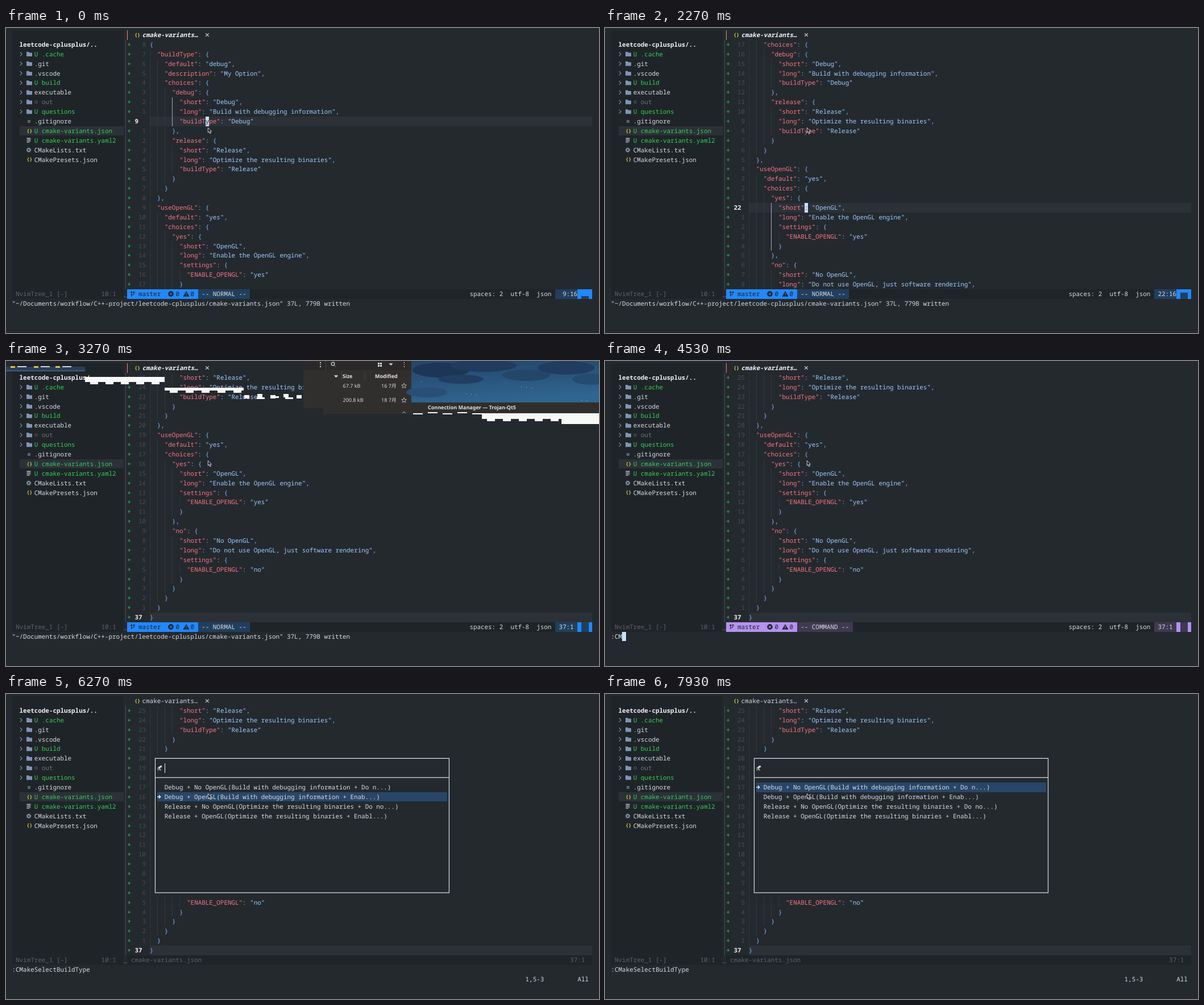
An HTML page that plays this animation: 1043x537 px, repeating every 8 s.

```html
<!DOCTYPE html>
<html lang="en">
<head>
<meta charset="utf-8">
<title>Editor session</title>
<style>
html, body { margin: 0; width: 100%; height: 100%; overflow: hidden; background: #24292e; }
svg { display: block; width: 100%; height: 100%; }
text {
  font: 10.907px "Noto Sans Mono", "DejaVu Sans Mono", monospace;
  font-variant-ligatures: none;
  text-rendering: geometricPrecision;
  white-space: pre;
}
.b { font-weight: 700; }
.bi { font-weight: 700; font-style: italic; }
.icon { font-size: 8.6px; font-weight: 700; }
.ui { font: 9px "Noto Sans", "Noto Sans CJK JP", sans-serif; }
.uib { font: 600 9px "Noto Sans", sans-serif; }
rect { shape-rendering: crispEdges; }
</style>
</head>
<body>
<svg id="stage" viewBox="0 0 1043 537">
  <defs>
    <linearGradient id="sky" x1="0" y1="0" x2="0.3" y2="1">
      <stop offset="0" stop-color="#234468"/><stop offset="1" stop-color="#30658f"/>
    </linearGradient>
  </defs>
</svg>
<script>
const LOOP = 8000, CW = 6.544, RH = 16.89, CODE = 37;
const X = c => 10.5 + c * CW;
const Y = r => 3.65 + r * RH;
const C = {
  bg: '#24292e', dark: '#1f2428', line: '#2c3138', text: '#d8dde3', white: '#f0f3f6',
  dim: '#5b636c', num: '#444d56', guide: '#30373e', scope: '#a4abb3', green: '#34d058',
  add: '#28a745', key: '#f97583', str: '#9ecbff', punct: '#79b8ff', cursor: '#c8e1ff',
  blue: '#2188ff', navy: '#213f5e', purple: '#b392f0', plum: '#40394f', yellow: '#cbcb41'
};

const variants = {
  buildType: {
    default: 'debug',
    description: 'My Option',
    choices: {
      debug: { short: 'Debug', long: 'Build with debugging information', buildType: 'Debug' },
      release: { short: 'Release', long: 'Optimize the resulting binaries', buildType: 'Release' }
    }
  },
  useOpenGL: {
    default: 'yes',
    choices: {
      yes: { short: 'OpenGL', long: 'Enable the OpenGL engine', settings: { ENABLE_OPENGL: 'yes' } },
      no: { short: 'No OpenGL', long: 'Do not use OpenGL, just software rendering', settings: { ENABLE_OPENGL: 'no' } }
    }
  }
};
const lines = JSON.stringify(variants, null, 2).split('\n');
const indent = lines.map(s => s.search(/\S/));

// [time, value] tracks with hard changes
const moves = [[0, 9], [270, 8], [800, 7], [870, 5], [930, 3], [1000, 1], [1270, 2], [2270, 22],
  [2330, 24], [2400, 26], [2470, 28], [2530, 30], [2600, 32], [2670, 35], [2800, 37]];
const typed = [[0, '"~/Documents/workflow/C++-project/leetcode-cplusplus/cmake-variants.json" 37L, 779B written'],
  [4130, ':'], [4330, ':C'], [4530, ':CM'], [4930, ':CMa'], [5130, ':CMakeSelectBuildType']];
const picks = [[5730, 9], [6270, 10], [6400, 11], [6600, 12], [6930, 11], [7130, 10], [7400, 9]];
const at = (track, t) => track.reduce((v, [time, next]) => t >= time ? next : v, track[0][1]);

const rect = (x, y, w, h, fill) => `<rect x="${x}" y="${y}" width="${w}" height="${h}" fill="${fill}"/>`;
const cells = (r, c, n, fill, rows = 1) => rect(X(c), Y(r), n * CW, rows * RH, fill);
const label = (x, y, s, fill, cls = '') => `<text x="${x}" y="${y}" fill="${fill}" class="${cls}">${s}</text>`;
const put = (r, c, s, fill, cls) => label(X(c), Y(r) + 12.3, s, fill, cls);
const path = (d, fill, stroke = 'none', sw = 1) =>
  `<path d="${d}" fill="${fill}" stroke="${stroke}" stroke-width="${sw}"/>`;
const shift = (x, y, body) => `<g transform="translate(${x} ${y})">${body}</g>`;
const mid = r => Y(r) + RH / 2;

const braces = (r, c) => label(X(c) - 0.5, Y(r) + 11.2, '{}', C.yellow, 'icon');
const icons = {
  folder: path('M-5-4h4l1.2 1.5H5V4H-5z', '#8094b4'),
  git: rect(-2.5, -2.5, 5, 5, '#59626b'),
  list: path('M-3.5-3.5h7M-3.5-1.2h7M-3.5 1.1h7M-3.5 3.4h5', 'none', C.text, 1.1),
  gear: '<circle r="3.3" fill="none" stroke="#8da5b0" stroke-width="1.6" stroke-dasharray="1.7 .9"/>' +
    '<circle r="2.2" fill="none" stroke="#8da5b0" stroke-width="1.2"/>'
};

const tree = [['folder', 'U .cache', C.green], ['folder', '.git'], ['folder', '.vscode'],
  ['folder', 'U build', C.green], ['folder', 'executable'], ['folder', '  out', '#6a737d'],
  ['folder', 'U questions', C.green], ['git', '.gitignore'], ['', 'U cmake-variants.json', C.green],
  ['list', 'U cmake-variants.yaml2', C.green], ['gear', 'CMakeLists.txt'], ['', 'CMakePresets.json']];

function sidebar() {
  let s = cells(0, 0, 30, C.dark, 28) + cells(10, 2, 28, C.line) +
    put(1, 2, 'leetcode-cplusplus/..', C.white, 'b');
  tree.forEach(([icon, name, fill = C.text], i) => {
    const r = i + 2, y = mid(r);
    if (icon === 'folder') s += shift(26.5, y, path('M-1.7-3.4L1.7 0L-1.7 3.4', 'none', '#8a929b', 1.1));
    s += icon ? shift(41 - (icon === 'folder' ? 0 : 1), y, icons[icon]) : braces(r, 4);
    s += put(r, 6, name, fill);
  });
  return s + `<circle cx="53" cy="${mid(7)}" r="2.2" fill="none" stroke="#6a737d" stroke-width=".8"/>` +
    rect(209.6, Y(1), 1, 26 * RH, '#454a57') +
    put(27, 1, 'NvimTree_1 [-]', C.dim) + put(27, 24, '10:1', C.dim) + put(27, 30, '_', C.dim);
}

const paint = s => s.replace(/("[^"]*")(:?)|[{},]+/g, (m, str, colon) => {
  const span = (v, fill) => `<tspan fill="${fill}">${v}</tspan>`;
  if (!str) return span(m, C.punct);
  return span(str, colon ? C.key : C.str) + (colon ? span(':', C.punct) : '');
});

// Block around the cursor line: [opening line, end], zero-based
function scope(i) {
  let a = i;
  const own = indent[i];
  if (!lines[i].endsWith('{')) {
    const closes = lines[i].trim()[0] === '}';
    do a--; while (closes ? indent[a] > own : indent[a] >= own);
  }
  let b = a + 1;
  while (indent[b] > indent[a]) b++;
  return [a, b];
}

function editor(t, line) {
  const top = Math.min(12, Math.max(1, line - 17));
  const row = n => n - top + 1;
  const [a, b] = scope(line - 1);
  const col = Math.min(16, lines[line - 1].length);
  let s = cells(row(line), CODE, 156 - CODE, C.line);
  for (let n = top; n < top + 26; n++) {
    const r = row(n), i = n - 1;
    s += put(r, 31, '+', C.add, 'b');
    s += n === line ? put(r, 33, n, C.white, 'b')
      : put(r, 33, String(Math.abs(n - line)).padStart(3), C.num);
    for (let k = 0; k < indent[i]; k += 2) {
      const lit = k && k === indent[a] && i > a && i < b;
      s += rect(X(CODE + k), Y(r), 1, RH, lit ? C.scope : C.guide);
    }
    s += put(r, CODE + indent[i], paint(lines[i].trim()), C.text);
  }
  if (t >= 1330 && line === 2) s += cells(row(17), 39, 1, '#2b6b70') + put(row(17), 39, '}', C.cursor);
  const hidden = t >= 3270 && t < 3870;
  if (t < 4130 && !hidden)
    s += cells(row(line), CODE + col - 1, 1, C.cursor) +
      put(row(line), CODE + col - 1, lines[line - 1][col - 1], C.dark);
  return s;
}

function tab(active) {
  return (active ? rect(213, Y(0), 1.4, RH, '#f9826c') : '') + braces(0, 33) +
    put(0, 35, 'cmake-variants…', active ? C.white : C.text, active ? 'bi' : '') +
    shift(353.9, mid(0), path('M-2.8-2.8L2.8 2.8M2.8-2.8L-2.8 2.8', 'none', C.text, 1.1));
}

function status(t, line) {
  const base = cells(27, 31, 125, C.dark);
  if (t >= 5730) return base + put(27, 32, 'cmake-variants.json', C.dim) + put(27, 150, '37:1', C.dim);
  const cmd = t >= 4130, main = cmd ? C.purple : C.blue, soft = cmd ? C.plum : C.navy;
  const mode = ` -- ${cmd ? 'COMMAND' : 'NORMAL'} -- `;
  const col = Math.min(16, lines[line - 1].length);
  const level = Math.ceil(line / 37 * 9) - 1;
  const y = mid(27);
  return base + cells(27, 31, 19, main) + cells(27, 50, mode.length, soft) +
    shift(222.8, y, path('M-2-3.5V4M-2 2Q2.3 2 2.3-2M-3.5-2L-2-4L-.5-2M1-2L2.3-4L3.6-2', 'none', C.dark, 1.1)) +
    put(27, 34, 'master', C.dark) +
    shift(290, y, `<circle r="4.8" fill="${C.dark}"/>` + path('M-2-2L2 2M2-2L-2 2', 'none', main, 1.2)) +
    put(27, 44, '0', C.dark) +
    shift(317, y, path('M0-5L5.6 4.6H-5.6z', C.dark) + path('M0-2V1.6M0 2.5V3.7', 'none', main, 1.2)) +
    put(27, 48, '0', C.dark) + put(27, 50, mode, C.text) +
    put(27, 123, 'spaces: 2', C.text) + put(27, 134, 'utf-8', C.text) + put(27, 141, 'json', C.text) +
    cells(27, 146, 6, soft) + put(27, 147, String(line).padStart(2) + ':' + col, C.text) +
    cells(27, 152, 4, main) +
    (level ? rect(X(153), Y(28) - RH * level / 8, 2 * CW, RH * level / 8, soft)
      : put(27, 153, '__', C.dark));
}

function prompt(t) {
  const s = at(typed, t);
  return put(28, 0, s, C.text) + (t >= 4130 && t < 5730 ? cells(28, s.length, 1, C.cursor) : '');
}

const options = ['Debug + No OpenGL(Build with debugging information + Do n...)',
  'Debug + OpenGL(Build with debugging information + Enab...)',
  'Release + No OpenGL(Optimize the resulting binaries + Do no...)',
  'Release + OpenGL(Optimize the resulting binaries + Enabl...)'];

function picker(t) {
  if (t < 5730) return '';
  const x1 = X(38.5), x2 = X(117.5), pick = at(picks, t);
  let s = cells(6, 38, 80, C.bg, 15) +
    path(`M${x1} ${mid(6)}H${x2}V${mid(20)}H${x1}zM${x1} ${mid(8)}H${x2}`, 'none', C.text, 1.2) +
    shift(270, mid(7), path('M-4 .5L3-3.5M-1.5 .5L-3 4.5M0 0L2.5 4.5M0 0V4', 'none', C.text, 1) +
      path('M-1.8-1.8L3-4.8L4.5-2.2L-.6 .8z', C.text));
  if (t < 7930) s += rect(X(41), Y(7), 1.2, RH, C.white);
  if (t >= 5800) {
    s += cells(pick, 39, 78, '#284669') +
      shift(X(39), mid(pick), path('M.3 0H5.8M3.2-2.7L6 0L3.2 2.7', 'none', C.white, 1.3));
    options.forEach((o, i) => s += put(9 + i, 41, o, C.text));
  }
  return s + put(29, 138, '1,5-3', C.text) + put(29, 152, 'All', C.text);
}

// Pieces of other windows that flash through for a moment
function flash(t) {
  if (t < 3270 || t >= 3400) return '';
  const white = '#f8f8f6', panel = '#312f2e';
  const teeth = (x, y, w, h, step) => {
    let s = rect(x, y, w, h, white);
    for (let k = 0; k * step < w - 10; k++) s += rect(x + k * step + 9, y + h, 14, 4, white);
    return s;
  };
  const dashes = (x, y, n, step, w, h) =>
    Array.from({ length: n }, (_, k) => rect(x + k * step, y - k % 2 * 2, w, h, white)).join('');
  const star = y => shift(700, y,
    path('M0-4.4L1.2-1.4L4.4-1.2L1.9 .8L2.7 4L0 2.2L-2.7 4L-1.9 .8L-4.4-1.2L-1.2-1.4z', 'none', '#c8c5c2', .9));
  const puff = (x, y, rx, ry, fill) => `<ellipse cx="${x}" cy="${y}" rx="${rx}" ry="${ry}" fill="${fill}"/>`;
  let s = rect(0, 10, 139, 8, '#2c3f58') + rect(0, 17, 139, 1, '#527aa5');
  for (const x of [8, 49, 87]) s += rect(x, 9, 8, 3, '#e2c04b') + rect(x + 12, 9, 16, 2, '#cfd6de');
  s += teeth(139, 28, 140, 9, 27) + teeth(279, 47, 139, 5, 28) +
    dashes(419, 60, 5, 23, 9, 6) + dashes(441, 64, 3, 25, 14, 3);

  s += rect(523, 0, 190, 83, panel) + rect(558, 80, 155, 13, panel) + rect(523, 0, 190, 16, '#2b2928') +
    rect(562, 0, 1, 16, '#454240') + rect(590, 18, 1, 17, '#454240') + rect(631, 18, 1, 17, '#454240') +
    '<circle cx="575" cy="5" r="2.8" fill="none" stroke="#ddd" stroke-width="1.2"/>' +
    path('M577 7.3l3 3M577.5 25.5h6l-3 3.5zM674 4.5h6l-3 3z', '#ddd', '#ddd', .6);
  for (const x of [552, 699.5]) for (const y of [2, 5.5, 9]) s += rect(x, y, 1.6, 1.6, '#ddd');
  for (const x of [654, 658]) for (const y of [3, 7]) s += rect(x, y, 2.6, 2.6, '#ddd');
  s += label(592, 30, 'Size', '#e4e1de', 'uib') + label(649, 30, 'Modified', '#e4e1de', 'uib');
  [['67.7 kB', '16 7月', 43.5], ['200.8 kB', '18 7月', 69]].forEach(([size, date, y]) =>
    s += label(592.5, y + 3.2, size, '#d8d4d0', 'ui') + label(660, y + 3.2, date, '#d8d4d0', 'ui') + star(y));
  s += path('M697 92l3-2.5l3 2.5', 'none', '#c8c5c2');

  s += rect(713, 0, 330, 74, 'url(#sky)') +
    puff(765, 16, 50, 13, '#1d3556') + puff(840, 8, 58, 11, '#203b5e') + puff(800, 32, 40, 8, '#213e62') +
    puff(915, 25, 42, 10, '#244669') + puff(985, 12, 50, 12, '#203d60') + puff(1030, 32, 34, 10, '#264b70') +
    puff(740, 55, 36, 9, '#294f76');
  for (let k = 0; k < 9; k++)
    s += rect(730 + k * 97 % 300, 36 + k * 23 % 35, 1, 1, '#a8c4d8');
  return s + rect(713, 73, 330, 19, '#302e2d') +
    `<text x="819.5" y="85" fill="#e4e1de" class="uib" text-anchor="middle">Connection Manager — Trojan-Qt5</text>` +
    dashes(716, 92, 5, 26, 17, 2) + teeth(837, 92, 140, 10, 28) + rect(977, 92, 66, 19, white);
}

const pointer = shift(355.3, 175.5,
  path('M0 0V8.6L2 6.9L3.5 10.3L5 9.6L3.6 6.4H6.2z', '#15181b', '#e8eaec', .9));
const stage = document.getElementById('stage');
const view = document.createElementNS('http://www.w3.org/2000/svg', 'g');
stage.append(view);
const side = sidebar();
let shown = '';

function draw(now) {
  const t = now % LOOP, line = at(moves, t);
  const scene = rect(0, 0, 1043, 537, C.bg) + side + tab(t < 5730) + editor(t, line) +
    status(t, line) + prompt(t) + picker(t) + flash(t) + pointer;
  if (scene !== shown) view.innerHTML = shown = scene;
  requestAnimationFrame(() => draw(performance.now() - start));
}
const start = performance.now();
draw(0);
</script>
</body>
</html>
```
